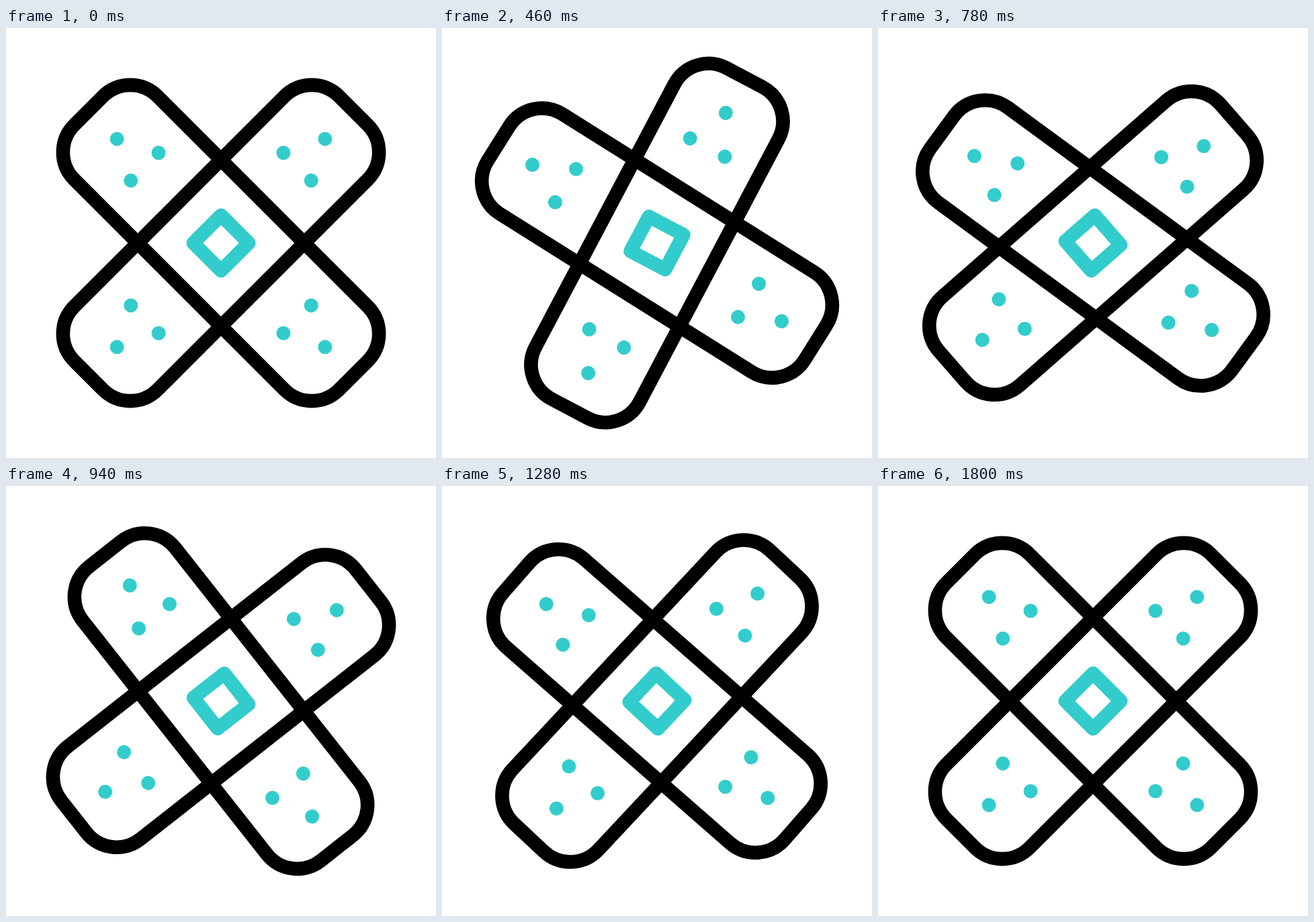
An HTML page that plays this animation: 640 px wide and 640 px high, repeating every 2.4 s.

```html
<!DOCTYPE html>
<html lang="en">
<head>
<meta charset="utf-8">
<title>Crossed bandages</title>
<style>
  html, body { margin: 0; width: 100%; height: 100%; overflow: hidden; background: #fff; }
  svg { display: block; width: 100%; height: 100%; }
</style>
</head>
<body>
<svg viewBox="-320 -320 640 640" fill="none" stroke-width="20.6" stroke-linejoin="round">
  <g id="rising"></g>
  <g id="falling"></g>
</svg>
<script>
const LOOP = 2400, STEP = 20, LAG = 120;
const TEAL = '#33cccc';
const UNIT = 29.2;

// Damped swing: each turning point reverses the last at a fixed ratio.
const TURNS = [0, 520, 874, 1178, 1434, 1680];
const FIRST_ANGLE = -17.8, DAMPING = -0.47;

const rising = document.getElementById('rising');
const falling = document.getElementById('falling');

function add(parent, tag, attributes) {
  const node = document.createElementNS('http://www.w3.org/2000/svg', tag);
  for (const name in attributes) node.setAttribute(name, attributes[name]);
  parent.appendChild(node);
}

function addBox(group, halfWidth, halfHeight, rx, stroke) {
  add(group, 'rect', {
    x: -halfWidth, y: -halfHeight, width: 2 * halfWidth, height: 2 * halfHeight, rx, stroke
  });
}

// Every bandage lies flat; its group turns it.
function buildBandage(group) {
  addBox(group, 278.6, 3 * UNIT, 57.5, '#000');
  for (const end of [-1, 1]) {
    for (const side of [-1, 0, 1]) {
      const along = side ? 5.5 : 7.5;
      add(group, 'circle', { cx: end * along * UNIT, cy: side * UNIT, r: 10.5, fill: TEAL });
    }
  }
}

function turnAngle(index) {
  const atRest = index === 0 || index === TURNS.length - 1;
  return atRest ? 0 : FIRST_ANGLE * DAMPING ** (index - 1);
}

function swingAngle(time) {
  const next = TURNS.findIndex(turn => time < turn);
  if (next < 1) return 0;
  const from = turnAngle(next - 1), to = turnAngle(next);
  const u = (time - TURNS[next - 1]) / (TURNS[next] - TURNS[next - 1]);
  return from + (to - from) * u * u * (3 - 2 * u);
}

function turn(group, angle) {
  group.setAttribute('transform', `rotate(${angle.toFixed(3)})`);
}

function render(time) {
  const t = Math.floor((time % LOOP) / STEP) * STEP;
  turn(rising, swingAngle(t) - 45);
  turn(falling, swingAngle(t - LAG) + 45);
}

buildBandage(rising);
addBox(rising, UNIT, UNIT, 0, TEAL);
buildBandage(falling);

const start = performance.now();
function tick() {
  render(performance.now() - start);
  requestAnimationFrame(tick);
}
render(0);
requestAnimationFrame(tick);
</script>
</body>
</html>
```
